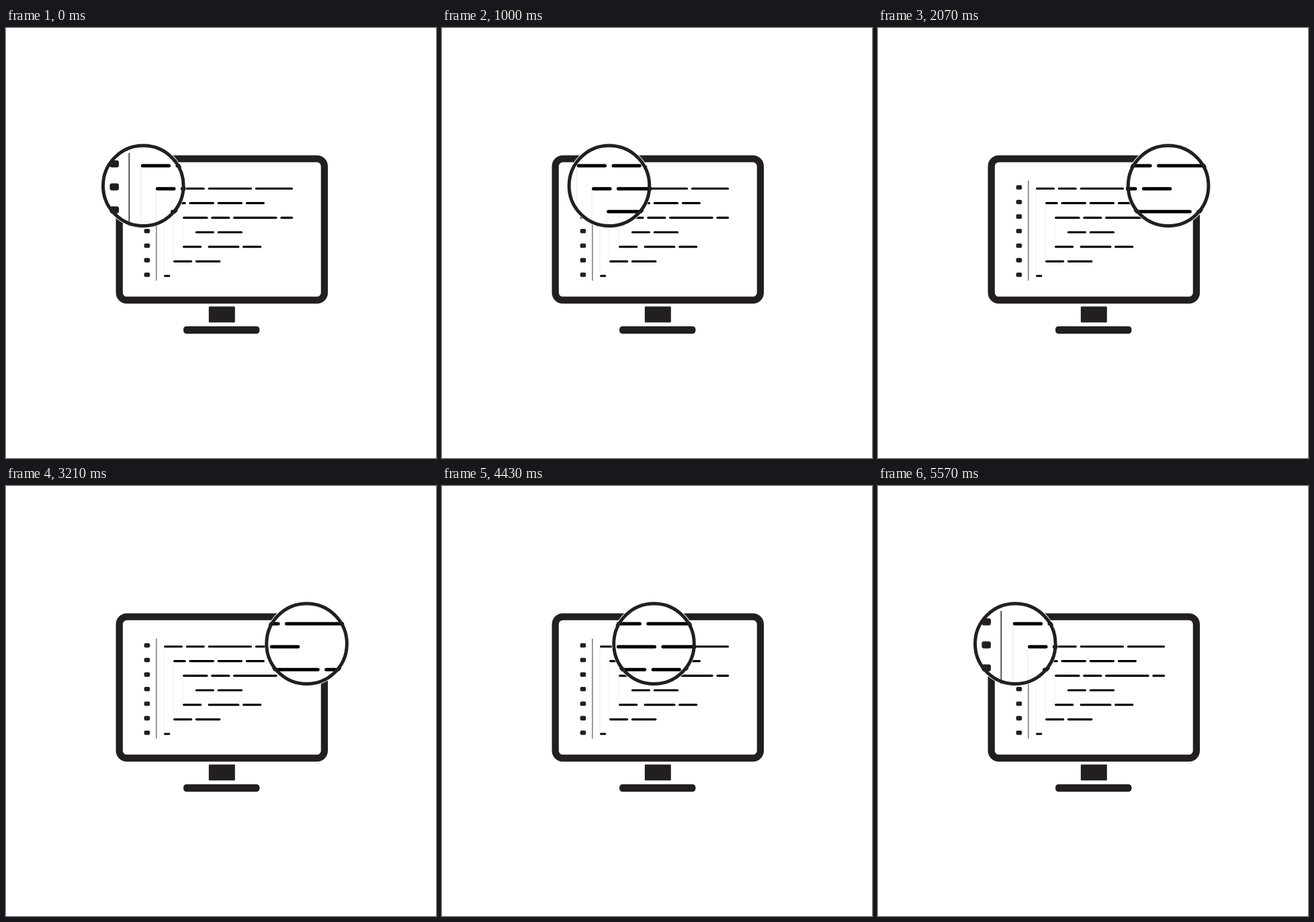
Animation of 640 by 640 pixels, one loop 7210 ms. Source, as an HTML page:

```html
<!DOCTYPE html>
<html lang="en">
<head>
<meta charset="utf-8">
<title>Code under a lens</title>
<style>
  html, body { margin: 0; width: 100%; height: 100%; overflow: hidden; background: #fff; }
  svg { display: block; width: 100vw; height: 100vh; }
  .ink { fill: #231f20; }
  .frame { fill: #fff; stroke: #231f20; stroke-width: 10.3; }
  .dash { stroke: #000; stroke-width: 3.2; stroke-linecap: round; }
  .guide { stroke: #e9e9e9; stroke-width: .7; }
  .margin { stroke: #231f20; stroke-width: .9; }
  .ring { fill: none; stroke: #231f20; stroke-width: 5; }
</style>
</head>
<body>
<svg viewBox="0 0 640 640">
  <defs>
    <g id="code"></g>
    <clipPath id="glass"><circle class="lens" cy="234.8" r="63.2"/></clipPath>
  </defs>
  <rect class="frame" x="168.7" y="194.7" width="305.2" height="210.3" rx="11"/>
  <rect class="ink" x="301.8" y="414.5" width="39" height="23.8" rx="1"/>
  <rect class="ink" x="264.1" y="443.9" width="113.3" height="11.1" rx="4.4"/>
  <use href="#code"/>
  <g clip-path="url(#glass)">
    <rect x="100" y="150" width="440" height="170" fill="#fff"/>
    <use href="#code" transform="translate(-169.8 -171.9) scale(1.577)"/>
  </g>
  <circle class="lens ring" cy="234.8" r="59.8"/>
</svg>
<script>
const SVG = 'http://www.w3.org/2000/svg';
const code = document.getElementById('code');

function add(tag, attrs) {
  const el = document.createElementNS(SVG, tag);
  for (const key in attrs) el.setAttribute(key, attrs[key]);
  code.append(el);
}
function line(cls, x1, y1, x2, y2) {
  add('line', { class: cls, x1, y1, x2, y2 });
}

// Each run of = is one dash; a space is half as wide as a =.
const text = [
  '=== === ======= ======',
  '   == ==== ==== ===',
  '      ==== === ======= ==',
  '          === ====',
  '      ===  ===== ===',
  '   === ====',
  '='
];
const LEFT = 235, TOP = 239, UNIT = 9.37, STEP = 21.67, CAP = 1.6;
const rowY = i => TOP + i * STEP;

for (let i = 0; i < 3; i++) {
  const x = LEFT + i * 1.5 * UNIT;
  line('guide', x, rowY(i) + 2, x, rowY(6 - i) - 2);
}
line('margin', 223.9, TOP - 12, 223.9, rowY(6) + 7);

text.forEach((row, i) => {
  const y = rowY(i);
  add('rect', { class: 'ink', x: 205.6, y: y - 5, width: 8.6, height: 6.6, rx: 2 });
  let x = LEFT;
  for (const run of row.match(/=+| +/g)) {
    const isDash = run[0] === '=';
    const end = x + run.length * UNIT * (isDash ? 1 : .5);
    if (isDash) line('dash', x + CAP, y, end - CAP, y);
    x = end;
  }
});

// Cubic bezier (a, 0, b, 1).
function ease(x, a, b) {
  if (x <= 0) return 0;
  if (x >= 1) return 1;
  let lo = 0, hi = 1, s = .5;
  for (let i = 0; i < 30; i++) {
    s = (lo + hi) / 2;
    const r = 1 - s;
    if (3 * s * r * r * a + 3 * s * s * r * b + s ** 3 < x) lo = s;
    else hi = s;
  }
  return s * s * (3 - 2 * s);
}

const LOOP = 7210, FPS = 14, LAST = 100, TRAVEL = 34;
const FROM = 204.3, TO = 447.6;
const lenses = document.querySelectorAll('.lens');

function lensX(step) {
  const out = ease(step / TRAVEL, .668, .626);
  const back = ease((step - 44.5) / TRAVEL, .66, .34);
  return FROM + (TO - FROM) * (out - back);
}

function draw() {
  const time = performance.now() % LOOP;
  const step = Math.min(LAST, Math.floor((time + 5) * FPS / 1000));
  const x = lensX(step).toFixed(2);
  for (const lens of lenses) lens.setAttribute('cx', x);
  requestAnimationFrame(draw);
}
draw();
</script>
</body>
</html>
```
